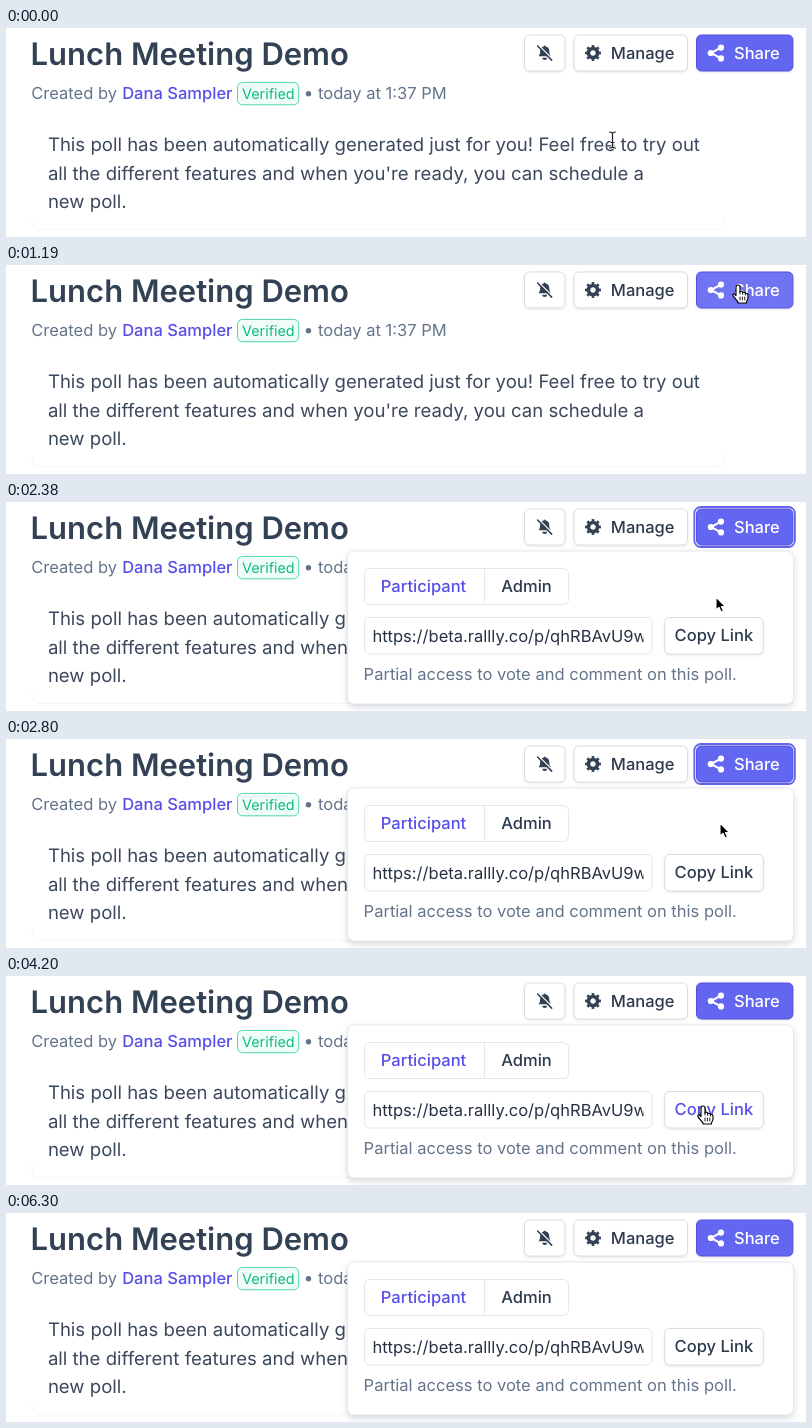
An HTML page that plays this animation: 800 px wide and 209 px high, repeating every 6370 ms.

```html
<!DOCTYPE html>
<html lang="en">
<head>
<meta charset="utf-8">
<title>Share a poll</title>
<style>
  html, body { margin: 0; width: 100%; height: 100%; overflow: hidden; background: #fff; }
  svg { display: block; width: 800px; height: 209px; }
  text {
    font: 400 16.55px Inter, "Liberation Sans", sans-serif;
    font-optical-sizing: none;
    text-rendering: geometricPrecision;
    fill: #64748b;
    white-space: pre;
  }
  .title { font-size: 31px; font-weight: 600; fill: #334155; }
  .body { font-size: 18.58px; fill: #3b485c; }
  .strong { font-weight: 500; fill: #2d3a4e; }
  .accent { font-weight: 500; fill: #574fe9; }
  .badge { font-size: 14.4px; fill: #10b981; }
  .url { fill: #263244; }
  .light { fill: #fff; }
  .box { fill: #fff; stroke: #d9dde3; }
  .soft { fill: #fff; stroke: #e5e7eb; }
  .icon { fill: #334155; stroke: none; }
  .drop { filter: drop-shadow(0 1px 1px rgba(15, 23, 42, .1)); }
  .panel { filter: drop-shadow(0 3px 3px rgba(15, 23, 42, .16)); }
</style>
</head>
<body>
<svg viewBox="0 0 800 209" xmlns="http://www.w3.org/2000/svg">
  <defs>
    <clipPath id="field"><rect x="366" y="116" width="271.5" height="35"/></clipPath>
  </defs>
  <rect width="800" height="209" fill="#fff"/>

  <text class="title" x="24.6" y="36.5">Lunch Meeting Demo</text>
  <text x="25.2" y="71">Created by</text>
  <text class="accent" x="116.2" y="71">Dana Sampler</text>
  <rect x="231.5" y="54.4" width="61.2" height="22.4" rx="5" fill="#effdf6" stroke="#4fd8a8"/>
  <text class="badge" x="236" y="71">Verified</text>
  <circle cx="302.5" cy="65.8" r="2.7" fill="#64748b"/>
  <text x="312" y="71">today at 1:37 PM</text>

  <path d="M26 188V194Q26 201.5 34 201.5H710Q718 201.5 718 194V188" fill="none" stroke="#f7f7f9"/>
  <text class="body" x="41.9" y="123.4">This poll has been automatically generated just for you! Feel free to try out</text>
  <text class="body" x="41.9" y="151.9">all the different features and when you're ready, you can schedule a</text>
  <text class="body" x="41.9" y="180.4">new poll.</text>

  <g class="drop">
    <rect class="box" x="518.5" y="7" width="40.5" height="36" rx="5"/>
    <rect class="box" x="568" y="7" width="113.5" height="36" rx="5"/>
  </g>
  <g class="icon" transform="translate(538.7 24.6) scale(.94)">
    <path d="M-6.4 4Q-4.8 2-4.8-1.6A4.8 5 0 0 1-1.1-6.4Q0-8.6 1.1-6.4A4.8 5 0 0 1 4.8-1.6Q4.8 2 6.4 4ZM-2.6 5.4H2.6A2.6 2.6 0 0 1-2.6 5.4Z"/>
    <path d="M-6.4-7.8L8.2 6.8" stroke="#fff" stroke-width="1.2"/>
    <path d="M-7.6-7L7.4 8" stroke="#334155" stroke-width="1.6" stroke-linecap="round"/>
  </g>
  <g transform="translate(587 25) scale(.95)" fill="none" stroke="#334155">
    <circle r="4.8" stroke-width="3.8"/>
    <circle r="7.1" stroke-width="2.6" pathLength="16" stroke-dasharray="1 1" stroke-dashoffset=".5"/>
  </g>
  <text class="strong" x="604.8" y="30.9">Manage</text>

  <g id="panel">
    <rect class="soft panel" x="341.5" y="49" width="446" height="153" rx="6.5"/>
    <rect class="soft" x="358.5" y="66.5" width="204" height="36" rx="5"/>
    <path d="M478.5 66.5V102.5" stroke="#e5e7eb"/>
    <text class="accent" x="374.8" y="90.2">Participant</text>
    <text class="strong" x="495.2" y="90.2">Admin</text>
    <rect class="soft" x="358.5" y="115.5" width="287.5" height="36.5" rx="5"/>
    <text class="url" x="366.4" y="139.8" clip-path="url(#field)">https://beta.rallly.co/p/qhRBAvU9w</text>
    <rect id="copyBox" class="box drop" x="658.7" y="115.5" width="98.6" height="36.5" rx="5"/>
    <text id="copyText" class="strong" x="668.6" y="139.3">Copy Link</text>
    <text x="357.6" y="178.2">Partial access to vote and comment on this poll.</text>
  </g>

  <rect id="ring" x="688.3" y="5" width="100.6" height="40" rx="6.5" fill="#fff" stroke="#6366f1" stroke-width="1.8"/>
  <rect id="share" class="drop" x="690.5" y="7" width="96.4" height="36" rx="4.8" stroke="#544fe0"/>
  <g fill="#fff" stroke="#fff" stroke-width="2">
    <path d="M714.8 19.6L705 25L714.8 30.4" fill="none"/>
    <g stroke="none">
      <circle cx="704.8" cy="25" r="3.1"/>
      <circle cx="715" cy="19.6" r="3.1"/>
      <circle cx="715" cy="30.4" r="3.1"/>
    </g>
  </g>
  <text class="strong light" x="728" y="30.7">Share</text>

  <g id="cursor">
    <g id="beam" fill="none" stroke-linecap="round">
      <path d="M-3-8Q0-8 0-6Q0-8 3-8M0-6V6M-3 8Q0 8 0 6Q0 8 3 8M-1.5 2.5H1.5" stroke="#fff" stroke-width="2.6"/>
      <path d="M-3-8Q0-8 0-6Q0-8 3-8M0-6V6M-3 8Q0 8 0 6Q0 8 3 8M-1.5 2.5H1.5" stroke="#222" stroke-width="1.2"/>
    </g>
    <path id="arrow" d="M0 0V13L3 10.3L5.1 15L7.5 14L5.4 9.5H9.4Z" fill="#000" stroke="#fff" stroke-width="1.1" stroke-linejoin="round"/>
    <g id="hand" stroke="#000" stroke-width="1.15" stroke-linejoin="round" stroke-linecap="round">
      <path d="M-2 2Q-2 0 0 0Q2 0 2 2V7Q3 5.6 4.4 6.6L4.7 7.6Q6.4 6.6 7.4 8.3Q9.6 7.8 10 10V13Q9.6 15 8.4 17V18H0V17Q-2.6 14-5 10.6Q-5.6 8.6-3.6 9L-2 10.6Z" fill="#fff"/>
      <path d="M2 7V9M4.7 7.6V9.4M7.4 8.3V10M2 12V15M4.4 12V15M6.8 12V15" fill="none" stroke-width=".9"/>
    </g>
  </g>
</svg>
<script>
  const LOOP = 6370, STEP = 70;
  const OPEN = 1470, FOCUS = [1330, 3570], PRESS = [3430, 3640], EXIT = 5530;
  // Pointer stops: time, x, y
  const stops = [
    [70, 606.5, 112], [560, 724.5, 29.5], [840, 732, 20],
    [2100, 732, 20], [2380, 710, 95], [2730, 714, 84],
    [3150, 714, 84], [3430, 697, 130], [5040, 697, 130], [EXIT, 688, 222]
  ];
  const el = {};
  document.querySelectorAll("[id]").forEach(node => el[node.id] = node);

  const ease = p => p * p * (3 - 2 * p);
  const during = (t, [from, to]) => t >= from && t < to;
  const inside = ([x, y], l, t, r, b) => x >= l && x <= r && y >= t && y <= b;
  const show = (node, on) => node.setAttribute("visibility", on ? "visible" : "hidden");

  function pointer(t) {
    const next = stops.findIndex(s => s[0] > t);
    if (next < 1) return (next ? stops[stops.length - 1] : stops[0]).slice(1);
    const [a, b] = [stops[next - 1], stops[next]];
    const p = ease((t - a[0]) / (b[0] - a[0]));
    return [1, 2].map(i => a[i] + (b[i] - a[i]) * p);
  }

  function draw(time) {
    const t = Math.floor(time % LOOP / STEP) * STEP;
    const at = pointer(t), open = t >= OPEN;
    const onShare = inside(at, 690, 7, 787, 43);
    const onCopy = open && inside(at, 658, 115, 758, 152);
    const onText = open ? inside(at, 358, 160, 731, 184) : inside(at, 42, 103, 693, 188);
    const onButton = onShare || onCopy;

    show(el.panel, open);
    show(el.ring, during(t, FOCUS));
    el.share.setAttribute("fill", onShare ? "#7174f2" : "#6366f1");
    el.copyText.setAttribute("class", onCopy ? "accent" : "strong");
    el.copyBox.style.stroke = during(t, PRESS) ? "#6366f1" : "";

    el.cursor.setAttribute("transform", `translate(${at[0]} ${at[1]})`);
    const visible = t < EXIT;
    show(el.hand, visible && onButton);
    show(el.beam, visible && onText);
    show(el.arrow, visible && !onButton && !onText);
  }

  const start = performance.now();
  function tick() {
    draw(performance.now() - start);
    requestAnimationFrame(tick);
  }
  tick();
</script>
</body>
</html>
```
